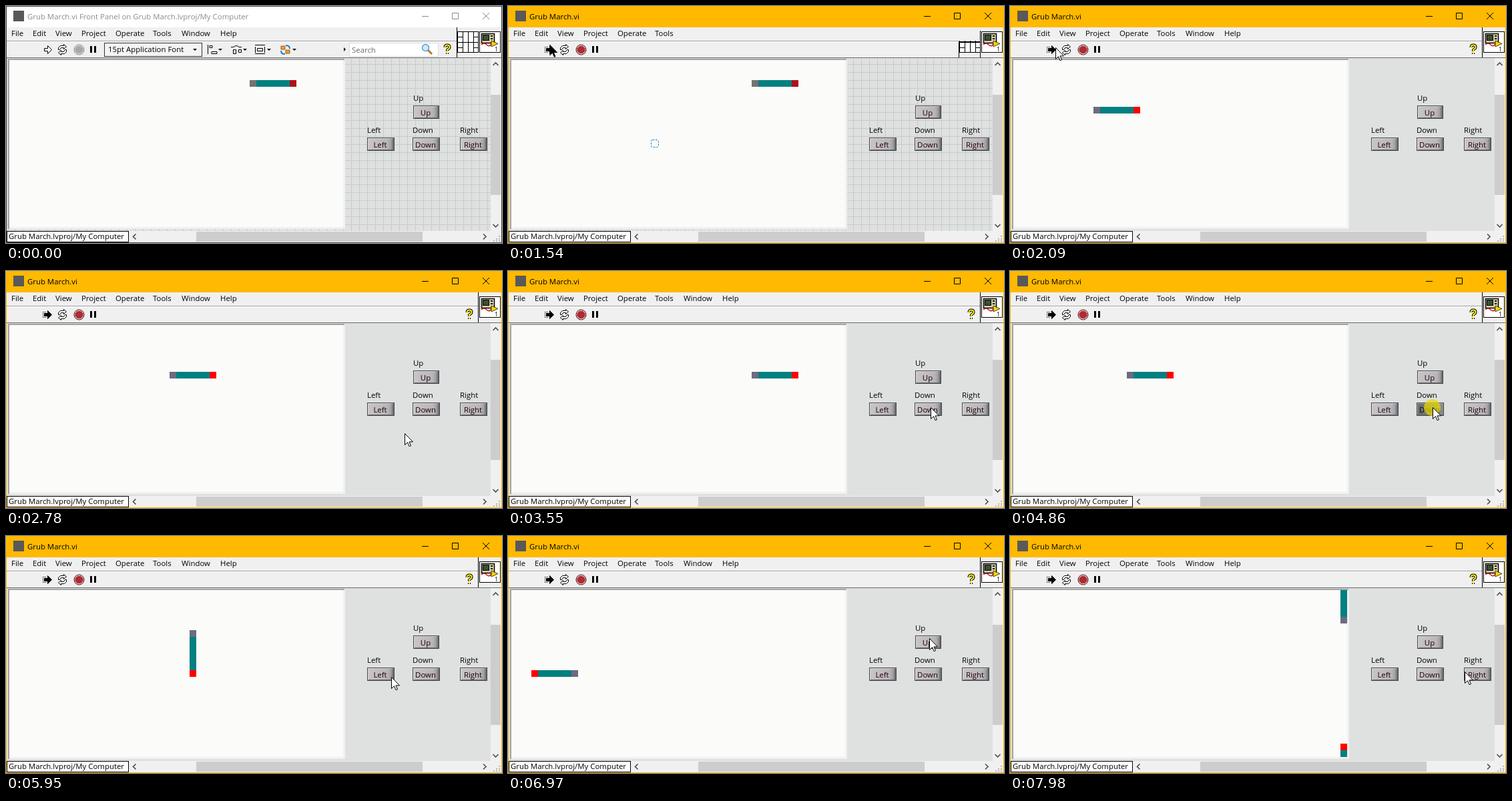
These frames come from a looping animation (743 px wide and 355 px high, 8000 ms). An HTML page:

```html
<!DOCTYPE html>
<html lang="en">
<head>
<meta charset="utf-8">
<title>Front panel</title>
<style>
html, body { margin: 0; width: 100%; height: 100%; overflow: hidden; }
svg { display: block; width: 743px; height: 355px; }
text { font: 11.4px "Open Sans", "Noto Sans", sans-serif; fill: #000; white-space: pre; }
.line { fill: none; stroke: #000; }
</style>
</head>
<body>
<svg viewBox="0 0 743 355">
  <defs>
    <pattern id="grid" x="1" y="87" width="12" height="12" patternUnits="userSpaceOnUse">
      <path d="M0 .5H12M.5 0V12" stroke="#c8cbcb"/>
    </pattern>
    <linearGradient id="up">
      <stop offset="0" stop-color="#c9c5c7"/><stop offset=".75" stop-color="#b9b5b8"/>
      <stop offset=".88" stop-color="#a2a0a4"/><stop offset="1" stop-color="#55595e"/>
    </linearGradient>
    <linearGradient id="down">
      <stop offset="0" stop-color="#66686a"/><stop offset="1" stop-color="#8d8d8f"/>
    </linearGradient>
    <path id="drop" d="M0 0h6l-3 3z"/>
  </defs>

  <!-- window -->
  <rect width="743" height="355" fill="#f0f0f0"/>
  <rect id="bar" width="743" height="32"/>
  <rect x="11" y="7" width="16" height="16" fill="#595959"/>
  <text id="title" x="32" y="20"></text>
  <path id="controls" fill="none" d="M623 15.5h10M668.5 10.5h9v9h-9zM714 10l10 10M724 10l-10 10"/>
  <g id="menu"></g>

  <!-- toolbar -->
  <path d="M0 52.5H707" stroke="#a0a0a0"/>
  <path d="M0 53.5H707" stroke="#fff"/>
  <path id="run" stroke="#000" d="M57.5 63.5h5v-4l6 6-6 6v-4h-5z"/>
  <path id="dash" stroke="#000" stroke-dasharray="1 1" d="M55.5 61v9M57.5 61v9M59.5 61v9"/>
  <g class="line">
    <path d="M78.5 65.5v-3l3-3h5v-2l4 3.500-4 3.500v-2h-4l-2 3zM90.500 65.500v3l-3 3h-5v2l-4-3.500 4-3.500v2h4l2-3z" fill="#fff"/>
  </g>
  <circle id="stop" cx="109.5" cy="65.5" r="7.500"/>
  <path id="stopSign" d="M107 60h5l3.500 3.500v4l-3.500 3.500h-5l-3.500-3.500v-4z"/>
  <path d="M126 60h3v10h-3zM132 60h3v10h-3z"/>
  <g id="tools">
    <rect x="147.5" y="55.5" width="146" height="20" fill="#f4f4f4" stroke="#333"/>
    <text x="153" y="69">15pt Application Font</text>
    <use href="#drop" x="280" y="64"/><use href="#drop" x="318" y="64"/>
    <use href="#drop" x="355" y="64"/><use href="#drop" x="391" y="64"/><use href="#drop" x="429" y="64"/>
    <path class="line" d="M302.5 58v14M305 59.5h4v3h-4zM308 68.5h8v3h-8z"/>
    <path class="line" d="M337 61.500h4q4-4 8 0h4M340.5 65.5h4v6h-4zM348.5 65.5h4v4h-4z"/>
    <path class="line" d="M373 58.5h15M373 71.5h15M376.500 63.500h8v4h-8zM373.500 61v9M387.500 61v9"/>
    <path d="M412 60h6v5h-6zM419 66h6v5h-6z" fill="#e9a23c" stroke="#a05a10"/>
    <path d="M419 59q6 0 6 5M418 72q-6 0-6-5" fill="none" stroke="#2878c8" stroke-width="2"/>
    <path d="M506 62l3 3-3 3z"/>
    <rect x="514.5" y="55.5" width="133" height="20" fill="#fff" stroke="#dcdcdc"/>
    <text x="518" y="70" style="fill:#6d6d6d">Search</text>
    <path d="M632 66l6 6" stroke="#b87830" stroke-width="3"/>
    <circle cx="628.5" cy="62.5" r="5" fill="#cfeafa" stroke="#5b9bd0" stroke-width="1.5"/>
  </g>
  <g id="help" fill="none">
    <path d="M-3.5 62q0-3.5 3.5-3.5t3.5 3q0 2-2 3t-1.5 3M0 70v2" stroke="#000" stroke-width="4"/>
    <path d="M-3.5 62q0-3.5 3.5-3.5t3.5 3q0 2-2 3t-1.5 3M0 70v2" stroke="#fff000" stroke-width="2"/>
  </g>
  <g id="pane">
    <rect x="676.5" y="38.5" width="31" height="31" fill="#fff" stroke="#000"/>
    <path class="line" d="M684.5 38v32M692.5 38v32M700.5 38v32M676 54.5h32M676 62.5h8M700 62.5h8M676 46.5h8M700 46.5h8"/>
  </g>
  <path id="paneCover" d="M675 32h32v20h-32z" fill="#f0f0f0"/>
  <path id="paneEdge" class="line"/>
  <rect x="709.5" y="38.5" width="31" height="31" fill="#fff" stroke="#000"/>
  <rect x="712.5" y="41.5" width="19" height="14" fill="#d8cfa8" stroke="#000" stroke-width="1.5"/>
  <rect x="714.5" y="43.5" width="9" height="8" fill="#385038" stroke="#000"/>
  <path d="M726 45h3M726 49h3" stroke="#000" stroke-width="2"/>
  <path d="M712 58q4-4 8 0t7-1" fill="none" stroke="#c01820" stroke-width="1.5"/>
  <path d="M727 52l10 4.500-10 4.500z" fill="#ffd400" stroke="#000" stroke-width=".7"/>
  <text x="732" y="68" style="font-size:9px">1</text>

  <!-- panel -->
  <path d="M0 77.5H743" stroke="#696969"/>
  <rect x="1" y="78" width="725" height="259" fill="#dfe1e1"/>
  <rect id="gridArea" x="1" y="78" width="725" height="259" fill="url(#grid)"/>
  <rect x="3" y="79" width="505" height="255" fill="#f0f1f1"/>
  <path d="M4 334V80H507" fill="none" stroke="#a2a4a4" stroke-width="2"/>
  <rect x="5" y="81" width="500" height="250" fill="#fbfbf9"/>
  <g id="snake"></g>
  <rect id="focus" x="214.5" y="200.5" width="11" height="11" rx="2" fill="none" stroke="#2a80c0" stroke-dasharray="3 1.5"/>
  <g id="buttons"></g>

  <!-- scroll bars -->
  <rect x="726" y="78" width="16" height="259" fill="#f0f0f0"/>
  <rect x="726" y="133" width="15" height="150" fill="#cdcdcd"/>
  <rect x="1" y="337" width="741" height="17" fill="#f0f0f0"/>
  <rect x="285" y="338" width="339" height="15" fill="#cdcdcd"/>
  <path fill="none" stroke="#505050" stroke-width="1.7" d="M729.5 89l4-4 4 4M729.5 327l4 4 4-4M194.5 341.5l-4 4 4 4M715 341.5l4 4-4 4"/>
  <path fill="#b5b5b5" d="M738 344h2v2h-2zM738 348h2v2h-2zM734 348h2v2h-2zM738 351h2v2h-2zM734 351h2v2h-2zM730 351h2v2h-2z"/>
  <rect x="1.5" y="337.5" width="182" height="16" fill="#fff" stroke="#000"/>
  <text x="4" y="349">Grub March.lvproj/My Computer</text>
  <rect id="border" x=".5" y=".5" width="742" height="354" fill="none"/>

  <circle id="click" r="12.5" fill="#e6d800" fill-opacity=".72"/>
  <path id="cursor" d="M0 0V17L4 13.2 6.6 19.2 9 18.2 6.5 12.4H12Z"/>
</svg>

<script>
const LOOP = 8000, TICK = 77.63, START = 450;
const $ = id => document.getElementById(id);
const clamp = (v, lo, hi) => Math.min(hi, Math.max(lo, v));
const mod = (v, n) => (v % n + n) % n;

function add(parent, tag, attrs, text = '') {
  const el = document.createElementNS('http://www.w3.org/2000/svg', tag);
  set(el, attrs);
  el.textContent = text;
  return parent.appendChild(el);
}
function set(el, attrs) {
  for (const name in attrs) el.setAttribute(name, attrs[name]);
}
const show = (id, on) => set($(id), { visibility: on ? 'visible' : 'hidden' });

const menus = { File: 8, Edit: 40, View: 74, Project: 113, Operate: 164, Tools: 220, Window: 263, Help: 321 };
const menuItems = Object.entries(menus).map(([name, x]) => add($('menu'), 'text', { x, y: 45 }, name));

const buttons = {};
for (const [name, x, y, w] of [['Up', 610, 149, 39], ['Left', 541, 197, 41], ['Down', 609, 197, 41], ['Right', 680, 197, 41]]) {
  const g = $('buttons');
  add(g, 'text', { x, y: y - 7 }, name);
  buttons[name] = add(g, 'rect', { x: x + .5, y: y + .5, width: w - 1, height: 19, stroke: '#45484b' });
  add(g, 'path', { d: `M${x + 1.5} ${y + 18}V${y + 1.5}H${x + w - 2}`, fill: 'none', stroke: '#fff', 'stroke-opacity': .4 });
  add(g, 'path', { d: `M${x + 2} ${y + 18.5}H${x + w - 1}`, stroke: '#6a6c6e' });
  add(g, 'text', { x: x + w / 2 - 1, y: y + 15, 'text-anchor': 'middle', style: 'fill:#1c0209' }, name);
}

const cells = Array.from({ length: 7 }, () => add($('snake'), 'rect', { width: 10, height: 10 }));

// [tick, values...]
const mouse = [[0, 152, 279], [7, 62, 57], [20, 62, 57], [24, 87, 76], [28, 560, 270], [30, 597, 243],
  [34, 630, 218], [40, 633, 204], [61, 633, 204], [68, 614, 208], [71, 577, 211], [73, 566, 207],
  [77, 566, 207], [79, 590, 190], [83, 631, 153], [87, 631, 153], [90, 672, 190], [97, 681, 203]];
const travel = [[17, 0], [30, 17], [40, 29], [57, 60], [71, 94], [79, 110], [86, 122], [90, 128], [97, 136]];
// [first tick, last tick, button]
const clicks = [[9, 11], [56, 59, 'Down'], [72, 75, 'Left'], [85, 87, 'Up']];

function at(keys, n) {
  const i = keys.findIndex(k => k[0] >= n);
  if (i < 0) return keys[keys.length - 1].slice(1);
  if (i === 0) return keys[0].slice(1);
  const a = keys[i - 1], b = keys[i], f = (n - a[0]) / (b[0] - a[0]);
  return a.slice(1).map((v, j) => v + (b[j + 1] - v) * f);
}

// Right, down, left, then up on a board of 50 by 25 cells that wraps.
function place(d) {
  return [
    mod(13 + Math.min(d, 64) - clamp(d - 94, 0, 28), 50),
    mod(7 + clamp(d - 64, 0, 30) - Math.max(0, d - 122), 25)
  ];
}

function drawSnake(n) {
  const moving = n > 14, head = Math.floor(at(travel, n)[0] + 1e-6);
  cells.forEach((cell, i) => {
    const [x, y] = moving ? place(head - i) : [42 - i, 3];
    const fill = i === 0 ? (moving ? '#ff0000' : '#b01018')
      : i === 6 ? (moving ? '#6c6c80' : '#737373') : '#008080';
    set(cell, { x: 5 + x * 10, y: 81 + y * 10, fill });
  });
}

function drawWindow(n) {
  const active = n >= 9, running = n >= 14, settled = n >= 15;
  const ink = active ? '#000' : '#8c8c8c';
  set($('bar'), { fill: active ? '#ffb900' : '#fff' });
  set($('border'), { stroke: active ? '#ffb900' : '#444' });
  set($('controls'), { stroke: ink });
  $('title').style.fill = ink;
  $('title').textContent = 'Grub March.vi' + (running ? '' : ' Front Panel on Grub March.lvproj/My Computer');
  menuItems.forEach((item, i) => set(item, { visibility: n === 14 && i > 5 ? 'hidden' : 'visible' }));
  set($('run'), { fill: running ? '#000' : '#fff' });
  set($('stop'), { fill: running ? '#e8c8c8' : '#ddd', stroke: running ? '#401010' : '#888' });
  set($('stopSign'), { fill: running ? '#b02a34' : '#a8a8a8' });
  set($('help'), { transform: `translate(${running ? 694 : 661} 0)` });
  set($('paneEdge'), { d: settled ? 'M707.5 32V77' : running ? 'M675.5 77V53.5H707.5M707.5 37V77' : 'M675.5 32V77' });
  show('dash', running);
  show('tools', !running);
  show('help', n !== 14);
  show('pane', !settled);
  show('paneCover', n === 14);
  show('gridArea', !settled);
  show('focus', n === 14);
}

function drawMouse(n) {
  const [x, y] = at(mouse, n).map(Math.round);
  const click = clicks.find(c => n >= c[0] && n <= c[1]);
  show('cursor', n >= 0);
  show('click', click);
  set($('cursor'), {
    transform: `translate(${x + .5} ${y + .5})`,
    fill: n > 14 ? '#fff' : '#000', stroke: n > 14 ? '#000' : 'none'
  });
  set($('click'), { cx: x - .5, cy: y + .5 });
  for (const name in buttons) {
    set(buttons[name], { fill: click && click[2] === name ? 'url(#down)' : 'url(#up)' });
  }
}

let last;
function frame(now) {
  const t = now % LOOP;
  const n = t < START ? -1 : Math.floor((t - START) / TICK + .2);
  if (n !== last) {
    drawWindow(n);
    drawSnake(n);
    drawMouse(n);
    last = n;
  }
  requestAnimationFrame(frame);
}
frame(performance.now());
</script>
</body>
</html>
```
